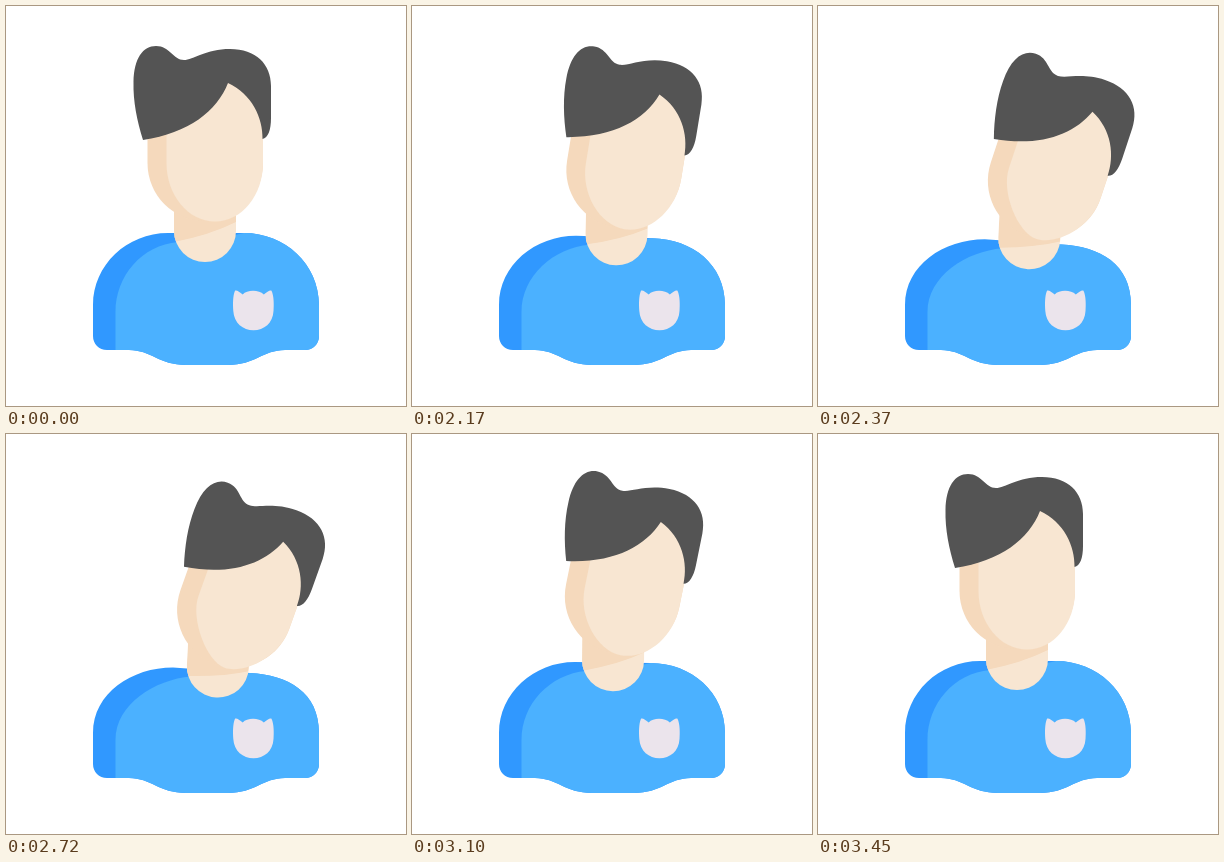
Recreate the animation shown at these times as an HTML page. Size 400 by 400 pixels, loop 3.47 s.

```html
<!DOCTYPE html>
<html lang="en">
<head>
<meta charset="utf-8">
<title>Tilting head</title>
<style>
  html, body { margin: 0; width: 100%; height: 100%; overflow: hidden; background: #fff; }
  svg { display: block; width: 100vw; height: 100vh; }
</style>
</head>
<body>
<svg viewBox="0 0 400 400">
  <defs>
    <clipPath id="neckClip"><path d="M168 192H230V225A31 31 0 0 1 168 225Z"/></clipPath>
  </defs>
  <path id="body" fill="#3098ff"/>
  <path id="front" fill="#4bb1ff"/>
  <path fill="#ebe4ec" d="M229 284.8C230.5 283.8 233.5 286 236.7 288.6C241 283.6 253 283.6 257.8 288.6C261 286 264 283.8 265.5 284.8C268 290 268 299 267.5 305C267 317 258 324.3 247.5 324.3C237 324.3 228 317 227.3 305C226.8 298 226.8 290 229 284.8Z"/>
  <g id="neck">
    <path fill="#f8e6d2" d="M168 192H230V225A31 31 0 0 1 168 225Z"/>
    <path id="shade" fill="#f5d9bc" clip-path="url(#neckClip)"/>
  </g>
  <g id="head">
    <path fill="#f5d9bc" d="M141.5 125V157C141.5 189 167 215 199 215S257 189 257 157V125Z"/>
    <path id="face" fill="#f8e6d2"/>
    <path fill="#545454" d="M137 134C131 115 127 95 127.5 76C128 52 137 40 150 40C164 40 167 54 178 54C187 54 200 43 224 43C250 43 265 58 265 80V112C265 124 262 132 256.5 133C257 112 246 88 222 77C211 105 183 127 137 134Z"/>
  </g>
</svg>
<script>
const LOOP = 3470;
const part = id => document.getElementById(id);
const body = part('body'), front = part('front'), neck = part('neck');
const shade = part('shade'), head = part('head'), face = part('face');

// Ease with handles at (x1, 0) and (x2, 1)
function ease(u, x1, x2) {
  if (u <= 0) return 0;
  if (u >= 1) return 1;
  let lo = 0, hi = 1, s = 0.5;
  for (let i = 0; i < 24; i++) {
    s = (lo + hi) / 2;
    const x = 3 * (1 - s) * (1 - s) * s * x1 + 3 * (1 - s) * s * s * x2 + s * s * s;
    if (x < u) lo = s; else hi = s;
  }
  return s * s * (3 - 2 * s);
}

const step = (t, [start, span, x1, x2]) => ease((t - start) / span, x1, x2);
// Rises over one step and falls back over another
const lean = (t, rise, fall) => step(t, rise) - step(t, fall);

function render(t) {
  const tilt = lean(t, [1998, 540, 0.36, 0.19], [2940, 485, 0.3, 0.37]);
  const pull = lean(t, [2020, 445, 0.3, 0.37], [2800, 430, 0.5, 0.5]);
  const slide = lean(t, [2045, 380, 0.4, 0.35], [2800, 370, 0.5, 0.5]);
  const back = Math.min(1, Math.max(0, (t - 2930) / 500));
  const lift = Math.sin(Math.PI * back);

  const hx = 12.1 * slide, hy = 8 * slide - lift;
  head.setAttribute('transform', `translate(${hx} ${hy}) rotate(${19.6 * tilt} 178 213)`);
  neck.setAttribute('transform', `translate(${12.8 * pull} ${7.6 * pull}) rotate(${3 * pull} 199 226)`);

  // The jaw shadow widens as the head leans over
  const jaw = 8 * tilt * tilt;
  face.setAttribute('d', `M160.5 122V157C160.5 ${189 - jaw} ${182 + jaw} 215.5 209 215.5` +
    'S257 189 257 157V131C257 108 245 86 222 72Z');

  const right = 216 + 12 * tilt * pull;
  shade.setAttribute('d', `M168 190H230V${right}Q204 ${(right + 236) / 2 + 3} 168 236Z`);

  const lx = 162 + 5 * pull, ly = 227 + 6.5 * pull;
  const rx = 238 + 6 * pull, ry = 227 + 12 * pull;
  const side = `L${rx} ${ry}C${rx + 41 - 3 * pull} ${ry + 2 * pull} 313 258 313 299V330C313 338 307 344 299 344H279` +
    'C257 344 249 359 222 359H180C153 359 145 344 123 344';
  body.setAttribute('d', `M87 330V299C87 259 ${lx - 41} ${ly} ${lx} ${ly}${side}H101C93 344 87 338 87 330Z`);
  const fx = 172 + 13 * pull, fy = 236 + 6.5 * pull;
  front.setAttribute('d', `M109.5 344V306C109.5 270 ${fx - 36} ${fy + 3} ${fx} ${fy}L199 ${fy}${side}Z`);
}

function tick(now) {
  render(now % LOOP);
  requestAnimationFrame(tick);
}
render(0);
requestAnimationFrame(tick);
</script>
</body>
</html>
```
